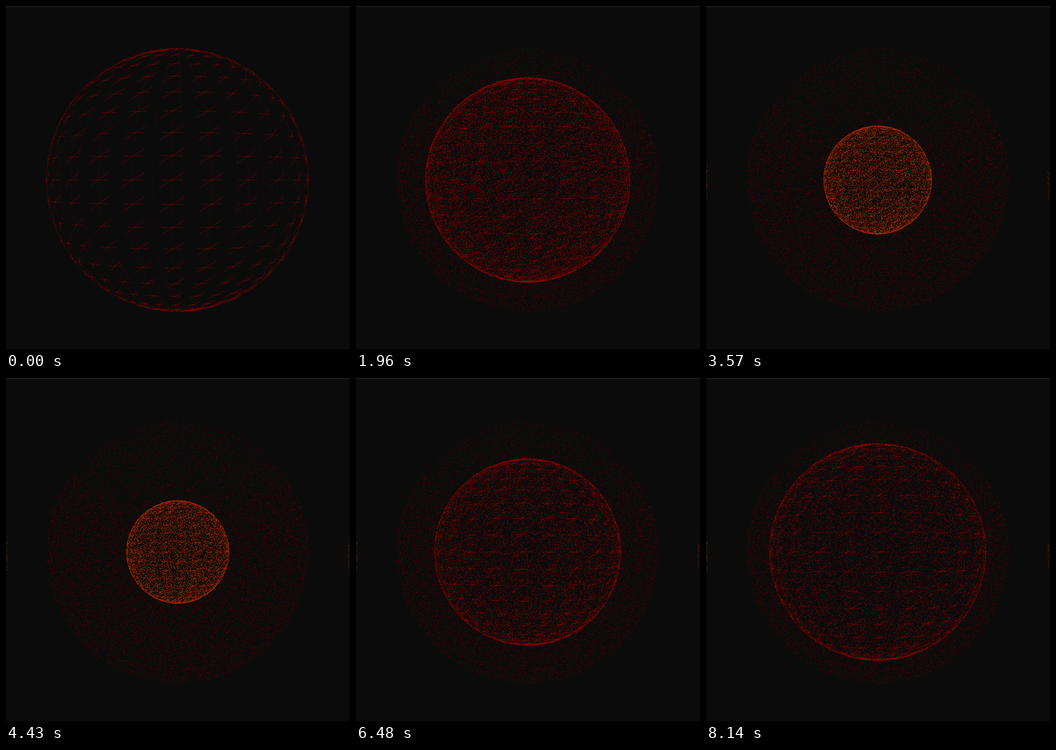
An HTML page with a canvas that plays this animation: 596 by 596 pixels, repeating every 8.2 s.

```html
<!DOCTYPE html>
<html>
<head>
<meta charset="utf-8">
<style>
html, body { margin: 0; width: 100%; height: 100%; overflow: hidden; background: #0b0b0b; }
canvas { display: block; }
</style>
</head>
<body>
<canvas id="stage" width="596" height="596"></canvas>
<script>
const SIZE = 596, LOOP = 8200, STEPS = 126, CX = 297.5, CY = 301.5, MAX_R = 228;
const COLS = 24, ROWS = 20, DEPTH = 6, BACK = '#0b0b0b', TAU = Math.PI * 2;
const BURST = 3050;
const ctx = document.getElementById('stage').getContext('2d');

// the slow drift of the radius, as [time, radius]
const drift = [[0, MAX_R], [1240, 190], [1770, 197], [2690, 98], [4430, 89], [5750, 151], [LOOP, 189]];

function radius(t) {
  const i = drift.findIndex(k => k[0] > t);
  const [t0, a] = drift[i - 1], [t1, b] = drift[i];
  return a + (b - a) * (t - t0) / (t1 - t0) + 202 * Math.exp(-(((t - BURST) / 150) ** 2));
}

function ramp(a, b, t) {
  const u = Math.min(1, Math.max(0, (t - a) / (b - a)));
  return u * u * (3 - 2 * u);
}

let seed = 7;
function rnd() {
  seed = (Math.imul(seed, 1664525) + 1013904223) >>> 0;
  return seed / 4294967296;
}

// specks that fill the sphere, denser towards the rim
const grains = Array.from({ length: 26000 }, () => {
  const d = Math.sqrt(1 - Math.pow(rnd(), 1.3)), a = rnd() * TAU;
  return [d * Math.cos(a), d * Math.sin(a)];
});

// dust left behind by the shrinking sphere
const trail = document.createElement('canvas');
trail.width = trail.height = SIZE;
const dust = trail.getContext('2d');
for (let i = 0; i < 21000; i++) {
  const d = MAX_R * Math.sqrt(rnd()), a = rnd() * TAU;
  if (Math.sin(a) < -.6 && rnd() < .45) continue;
  dust.fillStyle = `rgb(${45 + rnd() * 60 | 0},0,0)`;
  dust.fillRect(CX + d * Math.cos(a) | 0, CY + d * Math.sin(a) | 0, 1, 1);
}

// specks the burst leaves at the left and right borders
const border = Array.from({ length: 70 }, () =>
  [rnd() < .5 ? rnd() * 3 | 0 : 595 - rnd() * 3 | 0, 302 + (rnd() + rnd() - 1) * 40 | 0]);

function specks(list, color, place) {
  ctx.fillStyle = color;
  for (const p of list) {
    const [x, y] = place(p);
    ctx.fillRect(x, y, 1, 1);
  }
}

function disc(r) {
  ctx.beginPath();
  ctx.arc(CX, CY, r, 0, TAU);
}

function stroke(path, width, alpha, dash) {
  ctx.lineWidth = width;
  ctx.globalAlpha = alpha;
  ctx.setLineDash(dash);
  path ? ctx.stroke(path) : ctx.stroke();
  ctx.globalAlpha = 1;
}

function wire(r, spin) {
  const R = r * Math.sqrt(DEPTH * DEPTH - 1) / DEPTH;
  const point = (i, j) => {
    const lat = (j / ROWS - .5) * Math.PI, lon = i / COLS * TAU + spin;
    const z = Math.cos(lat) * Math.cos(lon), k = R * DEPTH / (DEPTH - z);
    return [CX + k * Math.cos(lat) * Math.sin(lon), CY + k * Math.sin(lat), z];
  };
  const faint = new Path2D(), bright = new Path2D();
  const segment = (path, p, q, u) => {
    path.moveTo(p[0], p[1]);
    path.lineTo(p[0] + (q[0] - p[0]) * u, p[1] + (q[1] - p[1]) * u);
  };
  for (let j = 1; j < ROWS; j++) {
    for (let i = 0; i < COLS; i++) {
      const p = point(i, j), front = p[2] > 0;
      segment(faint, p, point(i, j + 1), 1);
      if (!front) continue;
      // the lines look solid only close to where they cross
      for (const s of [-1, 1]) {
        segment(bright, p, point(i + s, j), .28);
        segment(bright, p, point(i + s, j - s), .32);
      }
    }
  }
  stroke(faint, .8, .5, [1, 3]);
  stroke(bright, .8, .7, [3, 1]);
}

function draw(now) {
  const t = Math.floor(now % LOOP / LOOP * STEPS) * LOOP / STEPS;
  const r = radius(t);
  const heat = ramp(1900, 2600, t) - ramp(4450, 5400, t);
  const grain = Math.min(1, t / 1240) * (1 - t / LOOP / 2) * 43 / r;
  const tone = v => `rgb(${v + 15 * heat | 0},${v * .27 * heat | 0},0)`;

  ctx.fillStyle = BACK;
  ctx.fillRect(0, 0, SIZE, SIZE);
  ctx.drawImage(trail, 0, 0);
  disc(r);
  ctx.fill();
  if (t > BURST) specks(border, '#5c2800', p => p);
  specks(grains.slice(0, grain * Math.PI * r * r), tone(122), ([x, y]) => [CX + x * r | 0, CY + y * r | 0]);

  ctx.strokeStyle = tone(170);
  wire(r, -.037 + t * .0002);
  disc(r - .5);
  stroke(null, 1.1, Math.min(.75, .35 + grain * 1.5), [3, 1, 1, 2]);

  ctx.fillStyle = '#1c1c1c';
  ctx.fillRect(0, 0, SIZE, 2);
  ctx.fillStyle = '#030303';
  ctx.fillRect(0, 594, SIZE, 2);
}

const start = performance.now();
function tick() {
  draw(performance.now() - start);
  requestAnimationFrame(tick);
}
tick();
</script>
</body>
</html>
```
